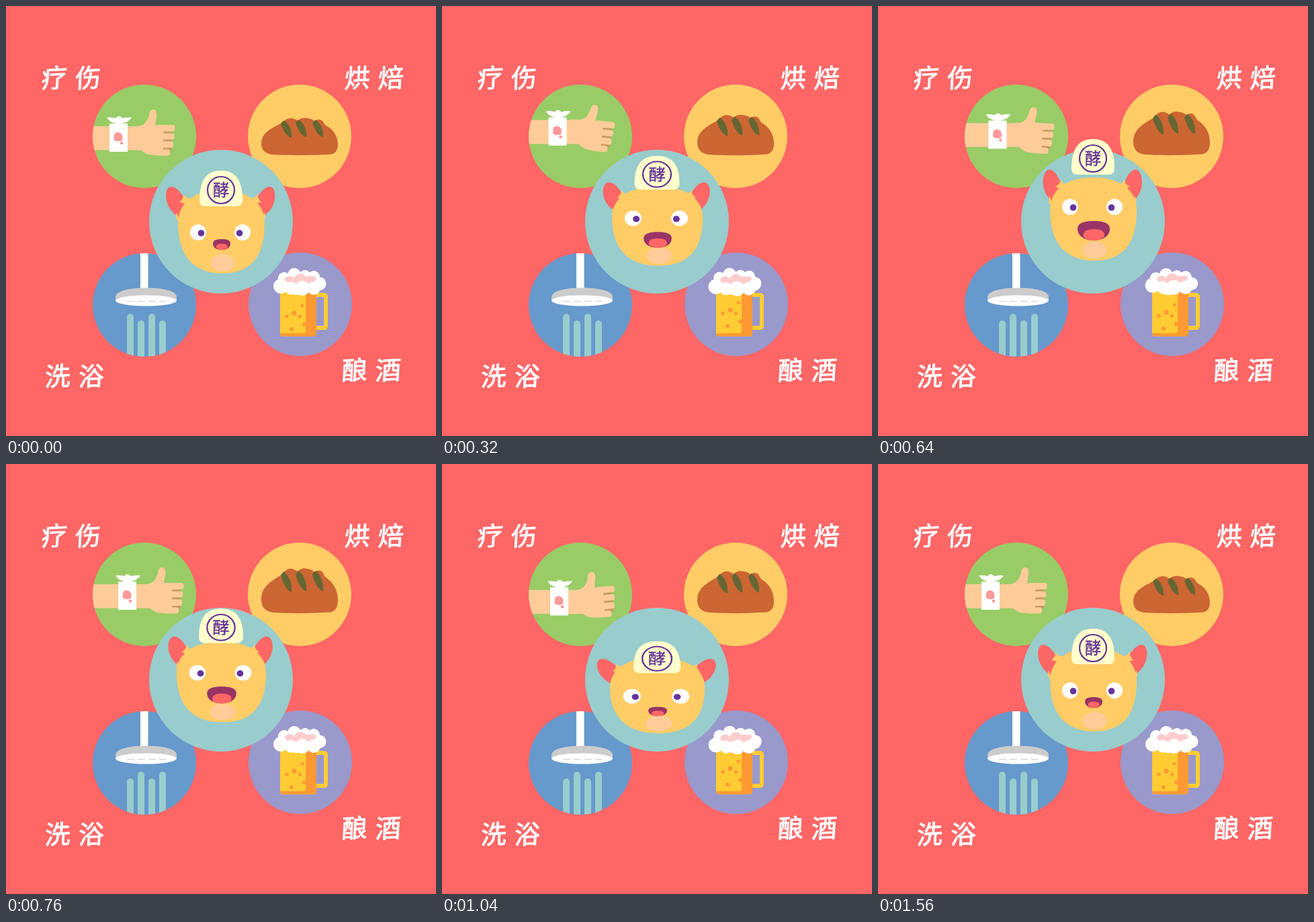
Animation, 640 px wide and 640 px high, one loop 1600 ms. Source, as an HTML page:

```html
<!DOCTYPE html>
<html lang="zh">
<head>
<meta charset="utf-8">
<title>酵</title>
<style>
  html, body { margin: 0; width: 100%; height: 100%; overflow: hidden; background: #f66; }
  svg { display: block; width: 100vw; height: 100vh; }
  text { font-family: "Noto Sans CJK SC", "Noto Sans CJK", sans-serif; text-anchor: middle; stroke-linejoin: round; }
</style>
</head>
<body>
<svg viewBox="0 0 640 640">
  <defs>
    <clipPath id="greenClip"><circle cx="206" cy="194" r="77"/></clipPath>
    <clipPath id="blueClip"><circle cx="206" cy="445" r="77"/></clipPath>
    <g id="horn">
      <path fill="#f66" d="M-48 -102C-55 -112 -62 -127 -73 -129C-83 -130 -84 -113 -79 -102C-75 -92 -67 -87 -61 -81Z"/>
      <path fill="#fc6" d="M-56 -118Q-56 -110 -62 -106L-45 -102L-46 -112Q-52 -112 -56 -118ZM-66 -91Q-69 -84 -65 -79L-56 -74L-59 -86Q-61 -81 -63 -83Q-65 -86 -66 -91Z"/>
    </g>
  </defs>
  <rect width="640" height="640" fill="#f66"/>
  <g id="labels" fill="#fff" stroke="#fff" stroke-width="1" font-size="38"></g>

  <circle cx="206" cy="194" r="77" fill="#9c6"/>
  <g clip-path="url(#greenClip)">
    <g id="arm">
      <g id="hand" fill="#fc9">
        <path d="M186 179H196C206 178 211 171 213 162C214 156 216 154 219 154C224 154 225 159 224 165C223 171 222 175 222 178L238 178V222C222 223 210 222 204 217Q201 214 196 214H186Z"/>
        <path fill="#c96" d="M234 187H247V215H234Z"/>
        <rect x="222" y="177" width="29.5" height="9.500" rx="3.500"/>
        <rect x="222" y="189.500" width="28.500" height="9" rx="3.500"/>
        <rect x="222" y="201.500" width="27" height="9.500" rx="3.500"/>
        <rect x="222" y="213.500" width="22" height="9" rx="3.500"/>
      </g>
      <rect x="90" y="179" width="110" height="35.500" fill="#fc9"/>
      <path fill="#fff" d="M154 175H181V217H154ZM150 166Q158 165 163 167Q168 161 173 167Q180 165 187 166Q183 173 172 175H164Q154 173 150 166Z"/>
      <path fill="#f99" d="M161 192Q162 188 167 188Q173 189 173.500 195Q174 201 170 201Q162 202 160.500 198Z"/>
      <circle cx="172" cy="204" r="2.300" fill="#f99"/>
    </g>
  </g>

  <circle cx="437" cy="194" r="77" fill="#fc6"/>
  <g id="bread">
    <path fill="#c63" d="M380 205C380 191 390 184 411 174Q417 166 426 167L434 170Q441 165 449 167Q456 168 459 171Q466 167 471 171L475 177C488 184 494 194 494 206C494 217 488 221 480 221C450 222.500 415 222.500 395 221C384 219 380 213 380 205Z"/>
    <path id="cut" fill="#663" d="M409 175Q412 171 414 170.500C422 176 426 186 425 196C417 194 412 184 409 175Z"/>
    <use href="#cut" x="22" y="-1"/>
    <use href="#cut" x="47" y="-1"/>
  </g>

  <circle cx="206" cy="445" r="77" fill="#69c"/>
  <g clip-path="url(#blueClip)">
    <rect x="200" y="360" width="11.500" height="65" fill="#fff"/>
    <path fill="#ccc" d="M163 434C163 423 186 419.500 208 419.500C234 419.500 254 424 254 433V438H163Z"/>
    <ellipse cx="208.500" cy="438.500" rx="45.500" ry="8" fill="#fff"/>
    <path d="M180 439.500H238" stroke="#ccc" stroke-dasharray="11 5"/>
    <g id="water" fill="#9cc"></g>
  </g>

  <circle cx="438" cy="444" r="77" fill="#99c"/>
  <rect x="455" y="430" width="21" height="49" rx="2.500" fill="none" stroke="#fc3" stroke-width="6"/>
  <path fill="#fc3" d="M408 420H462V487Q462 491.500 457 491.500H413Q408 491.500 408 487Z"/>
  <path fill="#f93" d="M446 420H462V487Q462 491.500 457 491.500H413Q409 491.500 408 487H443Q446 487 446 483Z"/>
  <g id="bubbles" fill="#f93"></g>
  <g id="foam"></g>

  <circle cx="320" cy="321" r="107" fill="#9cc"/>
  <g id="body">
    <g id="hornL"><use href="#horn"/></g>
    <g id="hornR"><use href="#horn"/></g>
    <path fill="#fc6" d="M0 -124C36 -124 65 -108 65 -75C65 -32 50 0 2 0C-46 0 -64 -32 -64 -75C-64 -108 -36 -124 0 -124Z"/>
    <ellipse cx="2.500" cy="-16" rx="18" ry="13" fill="#fc9"/>
  </g>
  <g id="eyes">
    <circle cx="-34" r="12" fill="#fff"/><circle cx="32" r="12" fill="#fff"/>
    <circle cx="-29.500" cy="1" r="4.800" fill="#639"/><circle cx="27.500" cy="1" r="4.800" fill="#639"/>
  </g>
  <g id="mouth">
    <path fill="#936" d="M-.5 -.1C-.5 -.42 -.25 -.5 0 -.5C.25 -.5 .5 -.42 .5 -.1C.5 .28 .28 .5 0 .5C-.28 .5 -.5 .28 -.5 -.1Z"/>
    <path fill="#f66" d="M-.32 .3C-.34 0 -.2 -.08 0 -.08C.22 -.08 .36 0 .33 .3C.24 .46 .12 .5 0 .5C-.12 .5 -.24 .45 -.32 .3Z"/>
  </g>
  <g id="hat">
    <path fill="#ffc" d="M-32 -9C-32 -37 -23 -53 0 -53C23 -53 32 -37 32 -9Q32 0 23 0H-23Q-32 0 -32 -9Z"/>
    <circle cy="-24" r="20" fill="none" stroke="#639" stroke-width="2.200"/>
    <text y="-15.500" font-size="24.500" fill="#639" stroke="#639" stroke-width=".4">酵</text>
  </g>
</svg>
<script>
const LOOP = 1600, STEP = 40, HALF = 760, CYCLE = 1560;
const $ = id => document.getElementById(id);
const move = (el, value) => el.setAttribute("transform", value);

function add(parent, tag, attrs) {
  const el = document.createElementNS("http://www.w3.org/2000/svg", tag);
  for (const k in attrs) el.setAttribute(k, attrs[k]);
  return parent.appendChild(el);
}

const circle = (parent, cx, cy, r, fill) => add(parent, "circle", { cx, cy, r, fill });

// Labels: two tilted characters each, placed by their centres
[["疗伤", 72, 107], ["烘焙", 523, 107], ["洗浴", 77, 551], ["酿酒", 519, 542]].forEach(([word, x, y]) =>
  [...word].forEach((ch, i) => {
    const el = add($("labels"), "text", { y: 14, transform: `translate(${x + i * 50} ${y}) skewY(-3) skewX(-3)` });
    el.textContent = ch;
  }));

const bars = [180, 196, 212, 228].map(x =>
  add($("water"), "rect", { x, width: 10, height: 90, rx: 5 }));

[[441, 446, 2.5], [429, 457, 3.6], [418, 462, 2.6], [437.5, 462, 2.6], [444, 474, 3], [425, 481, 3]]
  .forEach(([x, y, r]) => circle($("bubbles"), x, y, r, "#f93"));

const foamRow = (fill, list) => {
  const row = add($("foam"), "g", {});
  list.forEach(([x, y, r]) => circle(row, x, y, r, fill));
  return row;
};
const backFoam = foamRow("#fff", [[414, 405, 9], [429, 400, 10], [445, 402, 9], [458, 403, 9], [467, 413, 9.5], [432, 413, 17]]);
const pinkFoam = foamRow("#fcc", [[422, 410, 8], [438, 408, 9.5], [450, 411, 9], [456, 409, 7]]);
const frontFoam = foamRow("#fff", [[409, 417, 11], [424, 420, 9.5], [441, 420, 11], [458, 420, 10], [467, 414, 9]]);

// Poses of the character
const rest = { base: 398, sx: 1, sy: 1, eye: 337, hat: 298, hatY: 1, mouth: 355, mw: 26, mh: 16, rot: 0, hx: 0, hy: 0 };
const squash = { base: 402, sx: 1.14, sy: .865, eye: 350, hat: 318, hatY: .85, mouth: 375, mw: 29, mh: 12.5, rot: -15, hx: 5, hy: 7 };
const jump = { base: 379, sx: 1, sy: 1, eye: 299, hat: 251, hatY: 1, mouth: 334.5, mw: 48, mh: 29, rot: 12, hx: 4, hy: -4 };
const poses = [[0, rest], [160, squash], [400, jump], [700, jump], [960, squash], [1200, rest], [LOOP, rest]];
const reach = [[0, 0], [160, 2], [480, 7], [760, 13], [1040, 7], [1280, 4], [CYCLE, 0], [LOOP, 0]];

const mix = (a, b, k) => a + (b - a) * k;

// Finds the keys around t and the share of the way between them
function span(keys, t) {
  const i = keys.findIndex(key => key[0] > t);
  const [t0, a] = keys[i - 1], [t1, b] = keys[i];
  return [a, b, (t - t0) / (t1 - t0)];
}

function drawHead(t) {
  const [a, b, k] = span(poses, t), p = {};
  for (const name in a) p[name] = mix(a[name], b[name], k);
  move($("body"), `translate(320 ${p.base}) scale(${p.sx} ${p.sy})`);
  const horn = `translate(${p.hx} ${p.hy}) rotate(${p.rot} -60 -98)`;
  move($("hornL"), horn);
  move($("hornR"), `translate(-1.5 0) scale(-1 1) ${horn}`);
  move($("eyes"), `translate(320 ${p.eye}) scale(${p.sx} ${p.sy})`);
  move($("mouth"), `translate(321 ${p.mouth}) scale(${p.mw} ${p.mh})`);
  move($("hat"), `translate(320 ${p.hat}) scale(${p.sx} ${p.hatY})`);
}

function draw(t) {
  // 0 to 1 on the way out, 1 to 2 on the way back
  const phase = t < HALF ? t / HALF : Math.min(2, 1 + (t - HALF) / (CYCLE - HALF));
  const turn = Math.PI * phase;

  const lift = -9.6 * Math.sin(turn);
  move($("arm"), `translate(${mix(...span(reach, t))} ${lift})`);
  move($("hand"), `rotate(${-.6 * lift} 198 197)`);

  const rise = 1 - Math.abs(1 - phase);
  move($("bread"), `translate(0 222) scale(1 ${1 + .2 * rise}) translate(0 -222)`);

  const flip = t < 1280 && Math.floor((t + 160) / 240) % 2;
  bars.forEach((bar, i) => bar.setAttribute("y", i % 2 === +flip ? 458 : 468));

  const sway = Math.cos(2 * turn) - 1, bob = Math.sin(2 * turn);
  move($("bubbles"), `translate(0 ${2.4 * sway})`);
  move(backFoam, `translate(${.5 * sway} ${-.3 * bob})`);
  move(pinkFoam, `translate(${.3 * sway} ${.5 * bob})`);
  move(frontFoam, `translate(${.8 * sway} ${1.4 * bob})`);

  drawHead(t);
}

const start = performance.now();
function tick() {
  const t = (performance.now() - start) % LOOP;
  draw(Math.floor(t / STEP) * STEP);
  requestAnimationFrame(tick);
}
tick();
</script>
</body>
</html>
```
